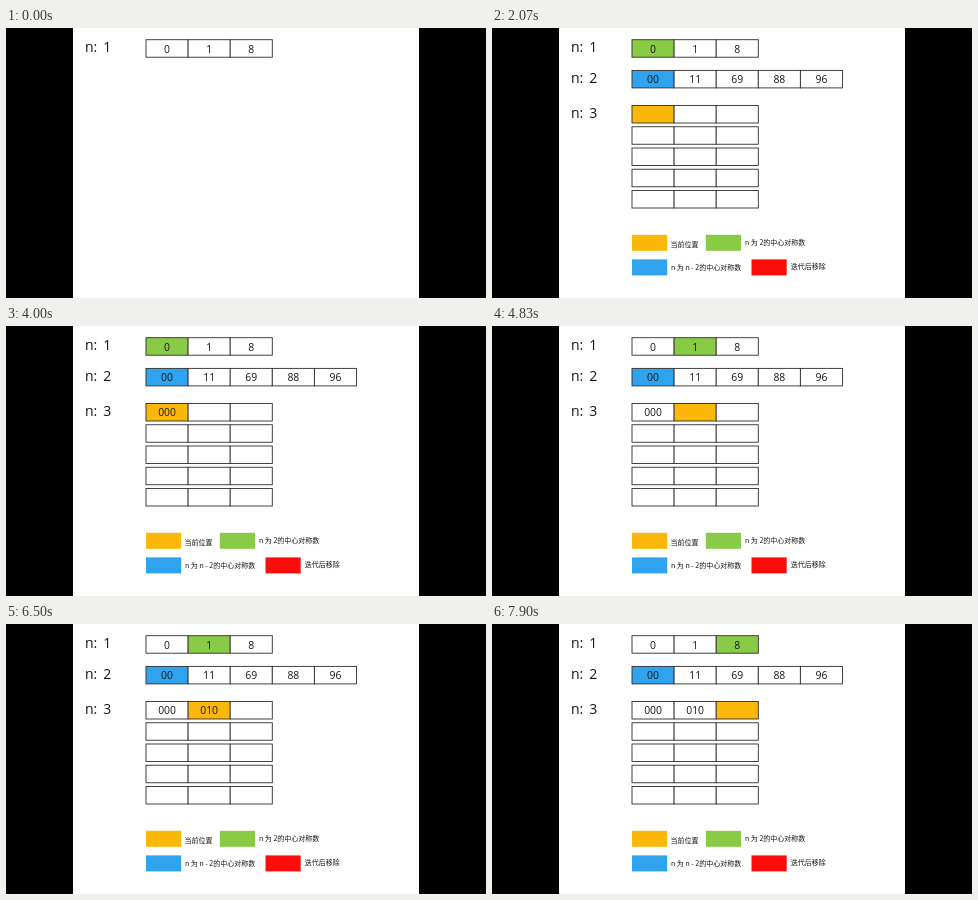
An HTML page that plays this animation: 480 by 270 pixels, repeating every 8000 ms.

```html
<!DOCTYPE html>
<html lang="zh">
<head>
<meta charset="utf-8">
<style>
html, body { margin: 0; width: 100%; height: 100%; overflow: hidden; background: #000; }
svg { display: block; width: 100vw; height: 100vh; }
text { fill: #161616; font-family: "Open Sans", "Noto Sans", sans-serif; }
.cell { font-size: 10.4px; text-anchor: middle; }
.label { font-size: 14px; }
.key { font-size: 7px; font-family: "Noto Sans CJK SC", "Noto Sans CJK", sans-serif; }
</style>
</head>
<body>
<svg id="stage" viewBox="0 0 480 270"></svg>
<script>
const stage = document.getElementById('stage');
const LOOP = 8000, FIRST = 500, STEP = 4000 / 3;
const LEFT = 140, CELL = 42.1, TALL = 17.5;
const ORANGE = '#fcb80a', GREEN = '#89ca47', BLUE = '#2fa3ee', RED = '#fb0d0c';

function add(parent, tag, attrs, content) {
  const el = document.createElementNS('http://www.w3.org/2000/svg', tag);
  for (const key in attrs) el.setAttribute(key, attrs[key]);
  if (content !== undefined) el.textContent = content;
  parent.appendChild(el);
  return el;
}

function makeRow(parent, y, values) {
  return values.map((value, i) => {
    const x = LEFT + i * CELL;
    const box = add(parent, 'rect', { x, y, width: CELL, height: TALL, fill: '#fefefe', stroke: '#303030', 'stroke-width': 0.9 });
    const text = add(parent, 'text', { class: 'cell', x: x + CELL / 2, y: y + 12.9 }, value);
    return { box, text };
  });
}

function makeLabel(parent, n, y) {
  add(parent, 'text', { class: 'label', x: 79, y }, 'n:');
  add(parent, 'text', { class: 'label', x: 97.3, y }, n);
}

function makeKey(parent, x, y, color, textX, textY, words) {
  add(parent, 'rect', { x, y, width: 35.2, height: 16, fill: color });
  add(parent, 'text', { class: 'key', x: textX, y: textY }, words);
}

add(stage, 'rect', { width: 480, height: 270, fill: '#000' });
add(stage, 'rect', { x: 67, width: 346, height: 270, fill: '#fefefe' });

const one = add(stage, 'g'), two = add(stage, 'g'), three = add(stage, 'g');

makeLabel(one, 1, 24);
const row1 = makeRow(one, 11.7, ['0', '1', '8']);

makeLabel(two, 2, 54.8);
const row2 = makeRow(two, 42.4, ['00', '11', '69', '88', '96']);

makeLabel(three, 3, 89.8);
const results = ['000', '010', '080'];
const grid = [0, 1, 2, 3, 4].map(r => makeRow(three, 77.5 + r * 21.25, ['', '', '']));

makeKey(three, 140, 206.8, ORANGE, 178.5, 218.6, '当前位置');
makeKey(three, 213.8, 206.8, GREEN, 253, 217.2, 'n 为 2的中心对称数');
makeKey(three, 140, 231.4, BLUE, 179, 242, 'n 为 n - 2的中心对称数');
makeKey(three, 259.5, 231.4, RED, 298.8, 240.6, '迭代后移除');

const show = (el, on) => el.setAttribute('visibility', on ? 'visible' : 'hidden');
const paint = (cell, color) => cell.box.setAttribute('fill', color || '#fefefe');

// Each result takes two steps: mark its cell, then write the number.
function draw(t) {
  const step = t < FIRST ? 0 : 1 + Math.floor((t - FIRST) / STEP);
  const active = step > 1 ? Math.floor((step - 2) / 2) : -1;
  show(two, step > 0);
  show(three, step > 1);
  row1.forEach((cell, i) => paint(cell, i === active && GREEN));
  paint(row2[0], active >= 0 && BLUE);
  grid[0].forEach((cell, i) => {
    paint(cell, i === active && ORANGE);
    cell.text.textContent = step >= 3 + 2 * i ? results[i] : '';
  });
}

const start = performance.now();
function tick() {
  draw((performance.now() - start) % LOOP);
  requestAnimationFrame(tick);
}
tick();
</script>
</body>
</html>
```
